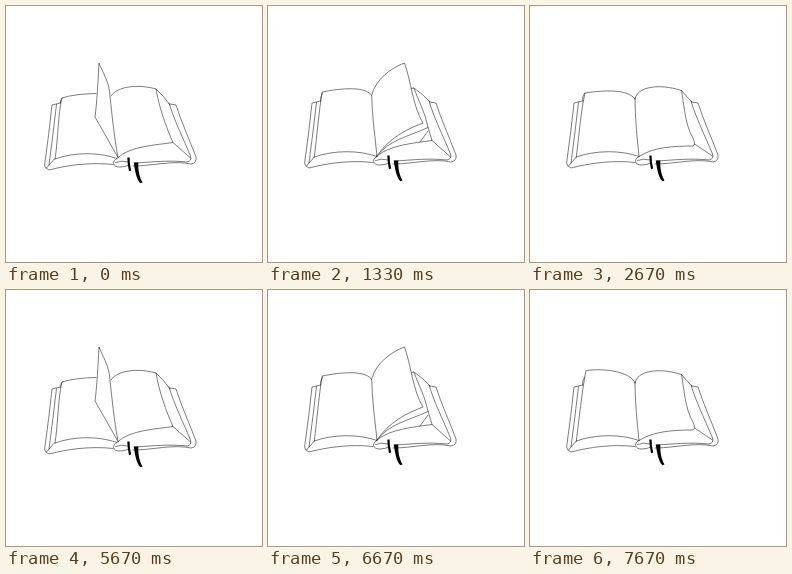
Write an HTML page with a canvas that moves like this. It is 256 by 256 pixels and loops after 8000 ms.

```html
<!DOCTYPE html>
<html lang="en">
<head>
<meta charset="utf-8">
<title>Open book</title>
<style>
html, body { margin: 0; width: 100%; height: 100%; overflow: hidden; background: #fff; }
canvas { display: block; width: 256px; height: 256px; }
</style>
</head>
<body>
<canvas id="stage"></canvas>
<script>
const canvas = document.getElementById('stage');
const ctx = canvas.getContext('2d');
const ratio = window.devicePixelRatio || 1;
canvas.width = canvas.height = Math.round(256 * ratio);

const LOOP = 8000;

function line(d) { ctx.stroke(new Path2D(d)); }

function sheet(d) {
  const p = new Path2D(d);
  ctx.fillStyle = '#fff';
  ctx.fill(p);
  ctx.stroke(p);
}

function ink(d) {
  ctx.fillStyle = '#000';
  ctx.fill(new Path2D(d));
}

function cover() {
  line('M52.5 95 L44 97 Q41 126 36.6 157 Q36.5 160 41 162 C60 157 83 154 105 156.5');
  line('M48.5 96.5 Q45 127 41 157');
  line('M46.3 151 L38.5 160');
  line('M162 96 L168 97 C173 113 182 133 188 149 Q189 155 183 156 C165 152 145 158 125 158');
  line('M161 95 C166 112 176 132 182.5 148 Q184 153 179 154 C160 152 145 154 127 155');
  line('M109 150.5 C103 153 105 159.5 112 159 Q117 159 121 157');
  line('M107.5 154.5 Q113 152 120 154');
}

function ribbon() {
  ink('M119.3 149.6 L121.6 149.6 Q121.4 156 123.2 162.5 L121 163.2 Q119.4 156 119.3 149.6 Z');
  ink('M125.7 154.5 L130.3 154.5 C130 163 131.5 169 134.5 174.5 L132.4 175.2 C128 171 127 162 125.7 154.5 Z');
}

const LEFT_BOTTOM = 'C66 144 91 144 109 150.5';

function leftPage(top) {
  line(top);
  line('M46.3 151 ' + LEFT_BOTTOM);
}

function fold() { line('M54.5 87 Q52 91 52.5 95'); }

function rightPage() {
  line('M105 93 C107 81 128 77 151.5 84.5 C154 98 155 119 163 132 Q166 139 163 140 C145 140 123 141 109 150.5');
  line('M151.5 84.5 Q156 90 162 96');
  line('M164.5 138 L182.5 150');
}

function spine() { line('M105 92 C105 111 107 132 109 150'); }

const FLAT = 'M46.3 151 C49 130 51 104 55 87 C75 84 98 83 105 93';

// Book as it lies just before the page is turned.
function early(lifted) {
  cover();
  line('M103 88 C109 78 131 76 148 81 C151 99 158 119 165 134.5 C149 137 122 138 110 149.5');
  line('M148 81 Q156 88 162 97');
  line('M165 134.5 L182.5 150');
  line('M47 151 C50 133 50 105 54 90 ' +
    (lifted ? 'Q66 86 88 85.5' : 'C73 84 96 82 103 90'));
  line('M54 90 Q52 92 52.5 95');
  line('M47 151 ' + LEFT_BOTTOM);
  if (lifted) sheet('M110 149.5 C106 128 104 106 102 89 C102 75 94 63 91 55 C90 74 89 94 87 109 Q99 130 110 149.5 Z');
  else line('M103 89 C104 110 107 130 110 149.5');
}

function lifting() {
  cover();
  leftPage('M46.3 151 C49 130 51 104 54.2 86 C74 82 99 80 104 90');
  fold();
  line('M146 82 Q155 88 162 96');
  line('M109 150 C122 139 146 137 164 134.5 L182.5 151');
  line('M160 121 L164 134.5 M160 125 L152 136');
  sheet('M109 150 C121 134 139 131 160 121.5 C157 106 150 94 146 82 L128 85 Z');
  sheet('M109 150 C107 130 104 110 103.7 89 C108 73 123 62 136.5 57 C143 75 145 101 155 117 C139 123 121 132 109 150 Z');
}

function upright() {
  cover();
  leftPage(FLAT);
  fold();
  rightPage();
  sheet('M109 150 C107 130 104 110 104 91 C107 76 113 63 122 51.5 C122 73 124 94 129 114 Q116 130 109 150 Z');
}

function falling() {
  cover();
  leftPage('M46.3 151 C49 130 51 104 54.2 86 Q72 83 91 82.5');
  fold();
  rightPage();
  sheet('M109 150 C107 128 104.5 109 104 91 C103 71 100 57 92 51.2 Q89.8 50.8 90.2 55 C93 74 91 92 90.7 107 C94 120 107 132 109 150 Z');
  line('M92 51.2 C94 64 94 91 92.5 106 C97 119 105 130 108 143');
}

function landing() {
  cover();
  leftPage('M46.3 151 C49 130 52 101 56 80.5 C76 78 101 82 105 93');
  fold();
  rightPage();
  spine();
}

function resting() {
  cover();
  leftPage(FLAT);
  fold();
  rightPage();
  spine();
}

const POSES = [
  [0, () => early(true), 2], [330, () => early(false), 2],
  [1330, lifting, 0], [1670, upright, 0], [2000, falling, 0], [2330, landing, 0],
  [2670, resting, 0],
  [5670, () => early(true), 2], [6000, () => early(false), 2],
  [6670, lifting, 0], [7000, upright, 0], [7330, falling, 0], [7670, landing, 0]
];

function draw(now) {
  const t = now % LOOP;
  const [, pose, shift] = POSES.filter(p => p[0] <= t).pop();
  ctx.setTransform(ratio, 0, 0, ratio, 0, 0);
  ctx.fillStyle = '#fff';
  ctx.fillRect(0, 0, 256, 256);
  ctx.translate(shift, shift);
  ctx.lineWidth = 0.55;
  ctx.lineJoin = ctx.lineCap = 'round';
  ctx.strokeStyle = '#111';
  pose();
  ribbon();
}

const start = performance.now();
function tick() {
  draw(performance.now() - start);
  requestAnimationFrame(tick);
}
tick();
</script>
</body>
</html>
```
